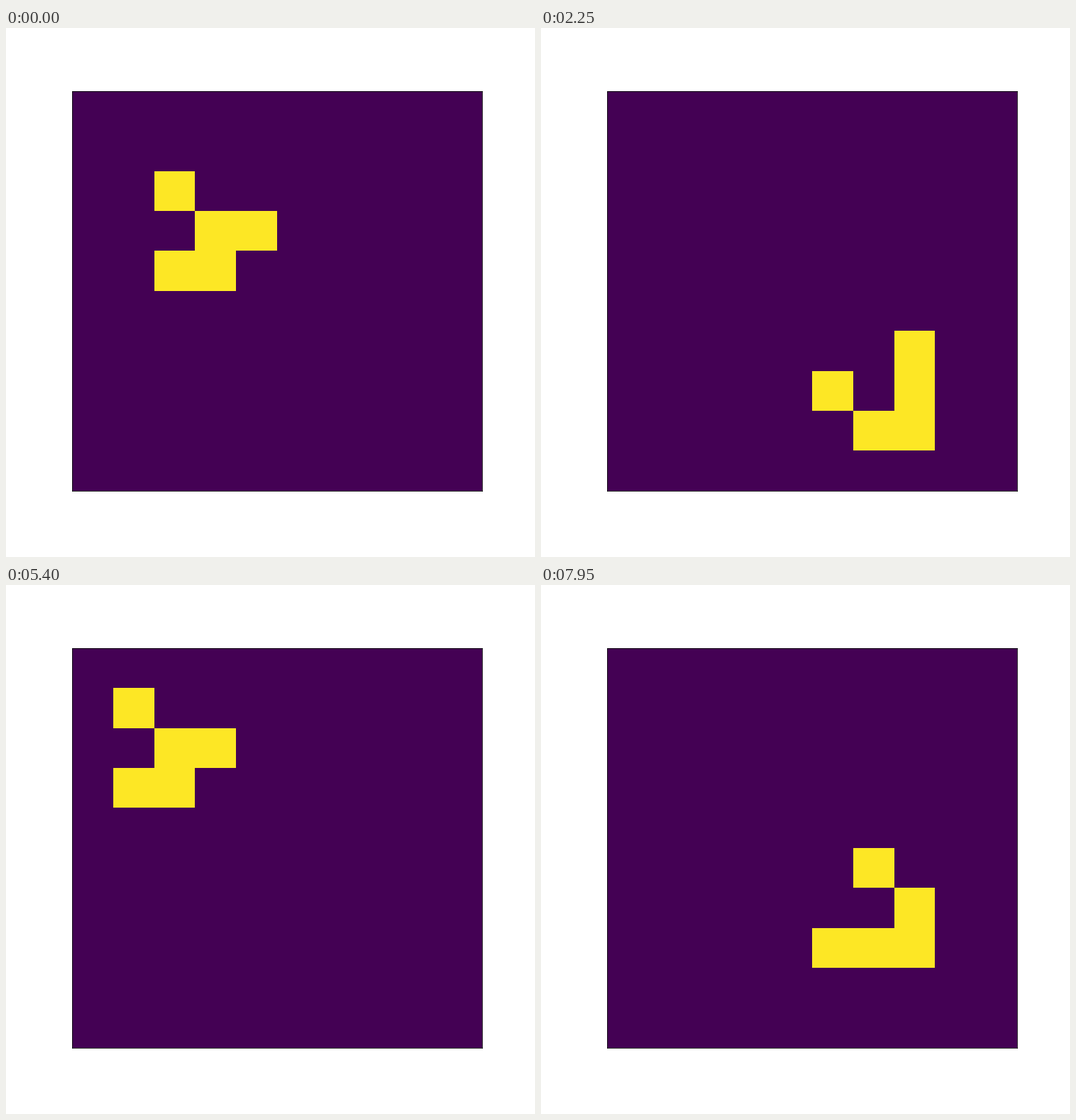
An HTML page with a canvas that plays this animation: 720x720 px, repeating every 8000 ms.

```html
<!DOCTYPE html>
<html lang="en">
<head>
<meta charset="utf-8">
<title>Glider</title>
<style>
  html, body { margin: 0; width: 100%; height: 100%; overflow: hidden; background: #fff; }
  canvas { display: block; }
</style>
</head>
<body>
<canvas id="stage" width="720" height="720"></canvas>
<script>
const SIZE = 10, STEP = 150, LOOP = 8000;
const DEAD = '#440154', ALIVE = '#fde725', FRAME = 'rgba(0, 0, 0, 0.8)';
const SEED = [[2, 2], [3, 3], [3, 4], [4, 2], [4, 3]];

const ctx = document.getElementById('stage').getContext('2d');
const edgeX = i => Math.round(90 + 55.8 * i);
const edgeY = i => Math.round(85.85 + 54.4 * i);
const wrap = i => (i + SIZE) % SIZE;

// One generation of the Game of Life on a torus.
function evolve(grid) {
  return grid.map((line, r) => line.map((cell, c) => {
    let sum = -cell;
    for (let dr = -1; dr <= 1; dr++)
      for (let dc = -1; dc <= 1; dc++)
        sum += grid[wrap(r + dr)][wrap(c + dc)];
    return sum === 3 || (cell && sum === 2) ? 1 : 0;
  }));
}

const first = Array.from({ length: SIZE }, () => Array(SIZE).fill(0));
for (const [r, c] of SEED) first[r][c] = 1;
const boards = [first];
while (boards.length < LOOP / STEP) boards.push(evolve(boards[boards.length - 1]));

function fill(color, x0, y0, x1, y1) {
  ctx.fillStyle = color;
  ctx.fillRect(x0, y0, x1 - x0, y1 - y0);
}

function draw(grid) {
  const left = edgeX(0), right = edgeX(SIZE), top = edgeY(0), bottom = edgeY(SIZE);
  fill('#fff', 0, 0, 720, 720);
  fill(DEAD, left, top, right, bottom);
  grid.forEach((line, r) => line.forEach((cell, c) => {
    if (cell) fill(ALIVE, edgeX(c), edgeY(r), edgeX(c + 1), edgeY(r + 1));
  }));
  fill(FRAME, left, top, left + 1, bottom + 1);
  fill(FRAME, right, top, right + 1, bottom + 1);
  fill(FRAME, left, top, right + 1, top + 1);
  fill(FRAME, left, bottom, right + 1, bottom + 1);
}

function tick() {
  draw(boards[Math.floor((performance.now() % LOOP) / STEP)]);
  requestAnimationFrame(tick);
}
tick();
</script>
</body>
</html>
```
